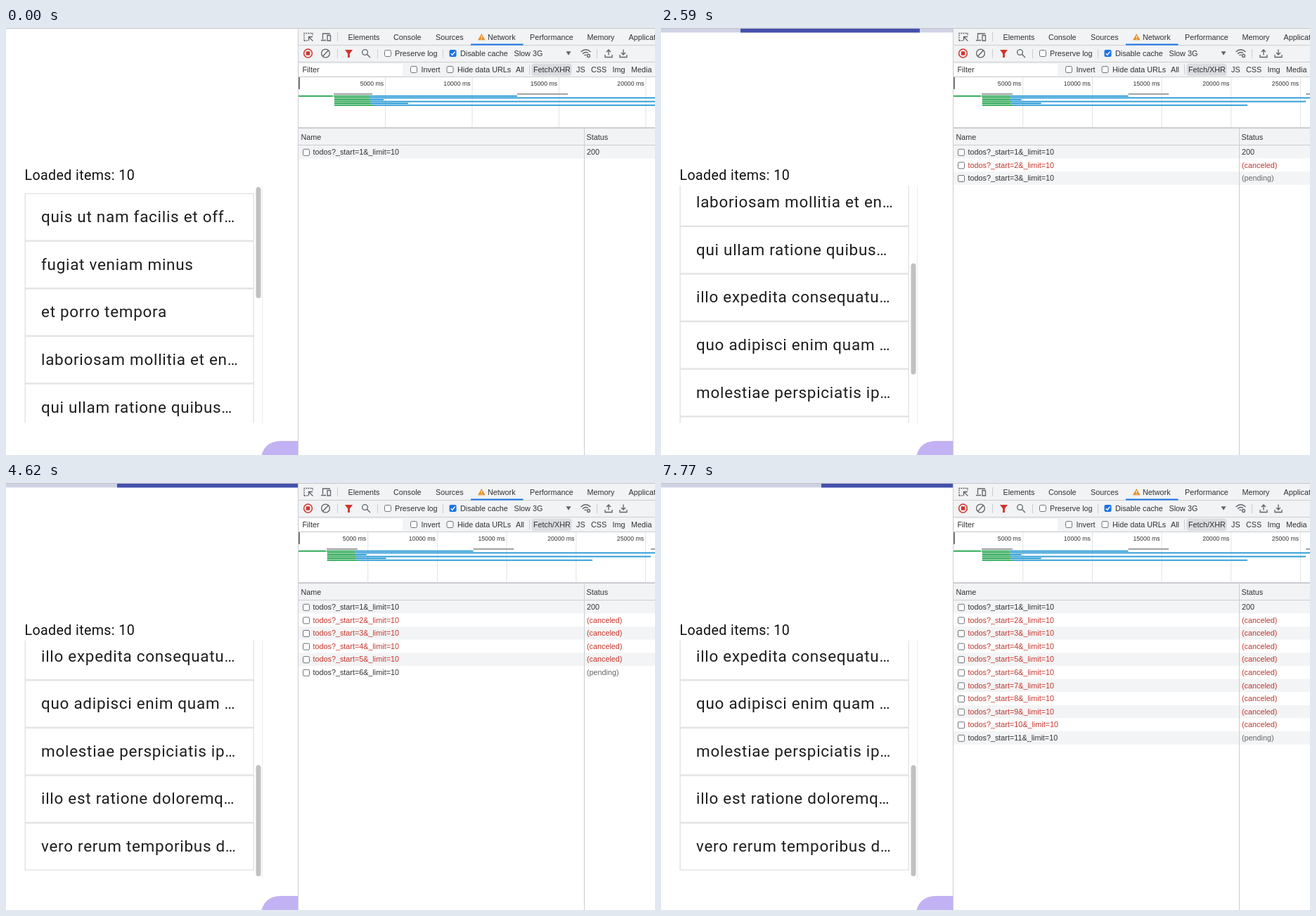
Recreate the animation shown at these times as an HTML page. Size 923x607 px, loop 7.84 s.

```html
<!DOCTYPE html>
<html lang="en">
<head>
<meta charset="utf-8">
<title>Infinite scroll</title>
<style>
html, body { margin: 0; width: 100%; height: 100%; overflow: hidden; background: #fff; }
svg { display: block; width: 923px; height: 607px; }
text { white-space: pre; }
.tools text { font: 10.8px "Liberation Sans", Arial, sans-serif; fill: #303235; }
.tools .tick { font-size: 8.7px; text-anchor: end; }
.tools .bad text { fill: #c5352b; }
.tools .wait .status { fill: #666; }
.label { font: 19.7px Roboto, sans-serif; letter-spacing: .0178em; fill: #111; }
.item text { font: 22.5px Roboto, sans-serif; letter-spacing: .03125em; fill: #1d1d1d; }
.item rect { fill: #fff; stroke: #e3e3e3; stroke-width: 1.4; }
.line { stroke: #cbcdd1; }
.icon { fill: none; stroke: #5f6368; stroke-width: 1.3; }
.box { fill: #fff; stroke: #707276; }
</style>
</head>
<body>
<svg viewBox="0 0 923 607">
  <defs>
    <clipPath id="view"><rect x="20" y="224" width="346" height="337.5"/></clipPath>
    <clipPath id="panel"><rect x="416" y="70" width="507" height="72"/></clipPath>
  </defs>

  <g id="progress">
    <rect y="1" width="415" height="5.4" fill="#cfd1e4"/>
    <path id="bars" fill="#4350ae"/>
  </g>
  <text class="label" x="26.5" y="216">Loaded items: 10</text>
  <g clip-path="url(#view)">
    <g id="list"></g>
    <path d="M364.5 224V562" stroke="#ebebeb"/>
    <rect id="thumb" x="355.5" width="7" height="158" rx="3.5" fill="#c1c1c1"/>
  </g>
  <path d="M363.500 607Q369 587 392 587H415V607Z" fill="#c3b2f3"/>

  <g class="tools">
    <path d="M416 0H923V70H416ZM416 143H923V166H416Z" fill="#f1f3f4"/>
    <rect x="417" y="51" width="147" height="17" fill="#fff"/>
    <rect x="747.500" y="50.500" width="57" height="17.500" rx="4" fill="#dadce0"/>
    <path class="line" d="M416 24.500H923M416 48.500H923M416 69.500H923M471.500 6V19M471.500 30V43M528.500 30V43M621.500 30V43M840.500 30V43M744.500 52V66"/>
    <rect x="661" y="22.500" width="74.500" height="2" fill="#1a73e8"/>
    <g id="labels"></g>

    <!-- tab strip icons -->
    <path class="icon" d="M424 18V7.500H436V11" stroke-dasharray="2 1.200"/>
    <path class="icon" d="M424 18H429" stroke-dasharray="2 1.200"/>
    <path class="icon" d="M430 12.500H436M430.500 12V18M430.500 12.500L436.500 18.500"/>
    <path class="icon" d="M450.500 16V8H461M448 17.500H455M457 10.500H461.500V18H457Z"/>
    <path d="M676.300 8L681.500 17.300H671Z" fill="#e8912d"/>
    <path d="M676.300 11V14M676.300 15V16.200" stroke="#fff" stroke-width="1.100"/>

    <!-- toolbar icons -->
    <circle cx="429.500" cy="36" r="5.900" fill="none" stroke="#d0342c" stroke-width="1.500"/>
    <rect x="426.800" y="33.300" width="5.400" height="5.400" fill="#d0342c"/>
    <circle class="icon" cx="454.500" cy="36" r="5.900"/>
    <path class="icon" d="M450.400 40.200L458.600 31.800"/>
    <path d="M482 31H493L488.900 36.500V42H486.100V36.500Z" fill="#d0342c"/>
    <circle class="icon" cx="510.500" cy="34.500" r="3.900"/>
    <path class="icon" d="M513.300 37.300L518 42" stroke-width="1.700"/>
    <path d="M796.500 33.300H803.500L800 38.800Z" fill="#5f6368"/>
    <path class="icon" d="M817.500 34Q824.500 27.500 831.500 34M820 36.800Q824 33 828 35.500M822.500 39Q824 37.500 825.500 38.500"/>
    <circle class="icon" cx="828.500" cy="39.500" r="2"/>
    <path class="icon" d="M857 38.500V31M854 34L857 31L860 34M852 38V41.500H862V38"/>
    <path class="icon" d="M878 30.500V38M875 35L878 38L881 35M873 38V41.500H883V38"/>
    <rect class="box" x="538.500" y="31.500" width="9" height="9" rx="2"/>
    <rect x="630.500" y="31" width="10" height="10" rx="2" fill="#1a73e8"/>
    <path d="M632.800 36.200L634.800 38.300L638.600 33.600" fill="none" stroke="#fff" stroke-width="1.500"/>
    <rect class="box" x="575.500" y="54.500" width="9" height="9" rx="2"/>
    <rect class="box" x="627" y="54.500" width="9" height="9" rx="2"/>

    <g id="overview" clip-path="url(#panel)"></g>
    <rect x="416" y="70" width="2" height="17" fill="#777"/>
    <rect x="416" y="141" width="507" height="2" fill="#cbcdd1"/>
    <g id="rows"></g>
    <path class="line" d="M416 166.500H923M822.500 143V607M415.500 0V607"/>
  </g>
  <path d="M0 .5H923" stroke="#c4c4c6"/>
</svg>
<script>
const $ = id => document.getElementById(id);
const LOOP = 7840, STEP = 70, FREEZE = 7280, START = 1120;
const PITCH = 67.6, MAX = 360.4;

const text = (x, y, s, cls = '') => `<text class="${cls}" x="${x}" y="${y}">${s}</text>`;
const rect = (x, y, w, h, fill) => `<rect x="${x}" y="${y}" width="${w}" height="${h}" fill="${fill}"/>`;

// fixed labels: baseline, then x and text
const labels = [
  [16.5, [[486.5, 'Elements'], [551, 'Console'], [611, 'Sources'], [685, 'Network'],
          [745, 'Performance'], [826.5, 'Memory'], [885.5, 'Application']]],
  [40, [[553, 'Preserve log'], [646, 'Disable cache'], [722.5, 'Slow 3G']]],
  [63, [[421.5, 'Filter'], [590.5, 'Invert'], [642, 'Hide data URLs'], [725, 'All'],
        [750, 'Fetch/XHR'], [811, 'JS'], [832, 'CSS'], [862.5, 'Img'], [889, 'Media']]],
  [158.5, [[419.5, 'Name'], [825.5, 'Status']]]
];
$('labels').innerHTML = labels.map(([y, row]) => row.map(([x, s]) => text(x, y, s)).join('')).join('');

const titles = ['quis ut nam facilis et off…', 'fugiat veniam minus', 'et porro tempora',
  'laboriosam mollitia et en…', 'qui ullam ratione quibus…', 'illo expedita consequatu…',
  'quo adipisci enim quam …', 'molestiae perspiciatis ip…', 'illo est ratione doloremq…',
  'vero rerum temporibus d…'];
$('list').innerHTML = titles.map((s, i) => {
  const y = 235.5 + i * PITCH;
  return `<g class="item"><rect x="27.2" y="${y}" width="325" height="${PITCH - 1}"/>${text(50, y + 40.6, s)}</g>`;
}).join('');

// request overview: [line, start, response, end] in pixels at 123.5 px per 5 s
const calls = [[0, 50, 100, 311], [1, 51, 102, 700], [2, 51, 100, 121],
  [3, 51, 104, 627], [4, 51, 102, 156], [5, 51, 106, 523]];
const idle = [[50, 105], [311, 383], [627, 700]];

function overview(pitch) {
  const k = pitch / 123.5;
  const bar = (a, b, y, fill) => rect(416 + a * k, y, (b - a) * k, 1.9, fill);
  let out = '';
  for (let n = 1; n * pitch < 507; n++) {
    const x = 416 + n * pitch;
    out += rect(x - .5, 70, 1, 71, '#e2e2e2') + text(x - 2.5, 82, n * 5000 + ' ms', 'tick');
  }
  out += idle.map(([a, b]) => bar(a, b, 92.9, '#9b9b9b')).join('');
  out += bar(0, 49, 95.8, '#27a552');
  out += calls.map(([i, a, m, b]) => {
    const y = 95.8 + i * 2.6;
    return bar(a, m, y, '#27a552') + bar(m, b, y, '#2a9bd6');
  }).join('');
  return out;
}
const views = [overview(123.5), overview(98.7)];

// when each request is sent; sending one cancels the previous
const sent = [0, START, 2170, 2800, 3500, 4480, 4970, 5390, 5810, 6230, 6650];
$('rows').innerHTML = sent.map((_, i) => {
  const y = 167 + i * 18.6;
  return `<g>${rect(416, y, 507, 18.6, i % 2 ? '#fff' : '#f3f4f5')}
    <rect class="box" x="422.5" y="${y + 5.3}" width="9" height="9" rx="1.5"/>
    ${text(436.5, y + 13, `todos?_start=${i + 1}&amp;_limit=10`)}${text(826, y + 13, '200', 'status')}</g>`;
}).join('');
const rows = [...$('rows').children];

const scroll = [[560, 0], [980, 348], [1610, 348], [1820, 200], [2170, 355], [2590, 223.6],
  [2660, 215], [2800, 350], [2940, MAX], [3640, MAX], [3990, 180], [4410, 355], [4480, MAX],
  [4620, MAX], [4760, 250], [4970, 355], [5180, 260], [5390, 358], [5600, 270], [5810, 358],
  [6020, 270], [6230, 350], [6370, 332], [6440, 300], [6650, 350], [6720, MAX]];

// sweep shapes: [ms, left, right]
const quick = [[0, 0, 0], [250, 0, 184], [440, 113, 368], [490, 161, 394.5],
  [540, 205, 415], [680, 323, 415], [790, 415, 415]];
const wide = [[0, 0, 0], [300, 0, 300], [420, 60, 415], [520, 158, 415], [600, 228, 415], [850, 415, 415]];
const sweeps = [[START, quick], [2150, quick], [2750, quick], [3570, quick], [4100, wide],
  [4900, quick], [6120, quick], [6680, wide]];

const linear = u => u;
const smooth = u => (1 - Math.cos(Math.PI * u)) / 2;

function at(keys, t, col, ease) {
  const i = keys.findIndex(k => k[0] > t);
  if (i < 0) return keys[keys.length - 1][col];
  if (!i) return keys[0][col];
  const a = keys[i - 1], b = keys[i];
  return a[col] + (b[col] - a[col]) * ease((t - a[0]) / (b[0] - a[0]));
}

let shown = -1;
function draw(t) {
  const s = at(scroll, t, 1, smooth);
  $('list').setAttribute('transform', `translate(0 ${-s})`);
  $('thumb').setAttribute('y', 226 + s / MAX * 175);

  $('progress').style.display = t < START ? 'none' : '';
  const p = Math.min(t, FREEZE);
  $('bars').setAttribute('d', sweeps.map(([t0, keys]) => {
    if (p < t0) return '';
    const l = at(keys, p - t0, 1, linear), r = at(keys, p - t0, 2, linear);
    return `M${l} 1H${r}V6.4H${l}Z`;
  }).join(''));

  const count = sent.filter(x => x <= t).length;
  if (count === shown) return;
  shown = count;
  $('overview').innerHTML = views[count > 1 ? 1 : 0];
  rows.forEach((row, i) => {
    const last = i === count - 1;
    row.style.display = i < count ? '' : 'none';
    row.setAttribute('class', !i ? '' : last ? 'wait' : 'bad');
    row.querySelector('.status').textContent = !i ? '200' : last ? '(pending)' : '(canceled)';
  });
}

const begin = performance.now();
function tick() {
  const t = (performance.now() - begin) % LOOP;
  draw(Math.floor(t / STEP) * STEP);
  requestAnimationFrame(tick);
}
tick();
</script>
</body>
</html>
```
